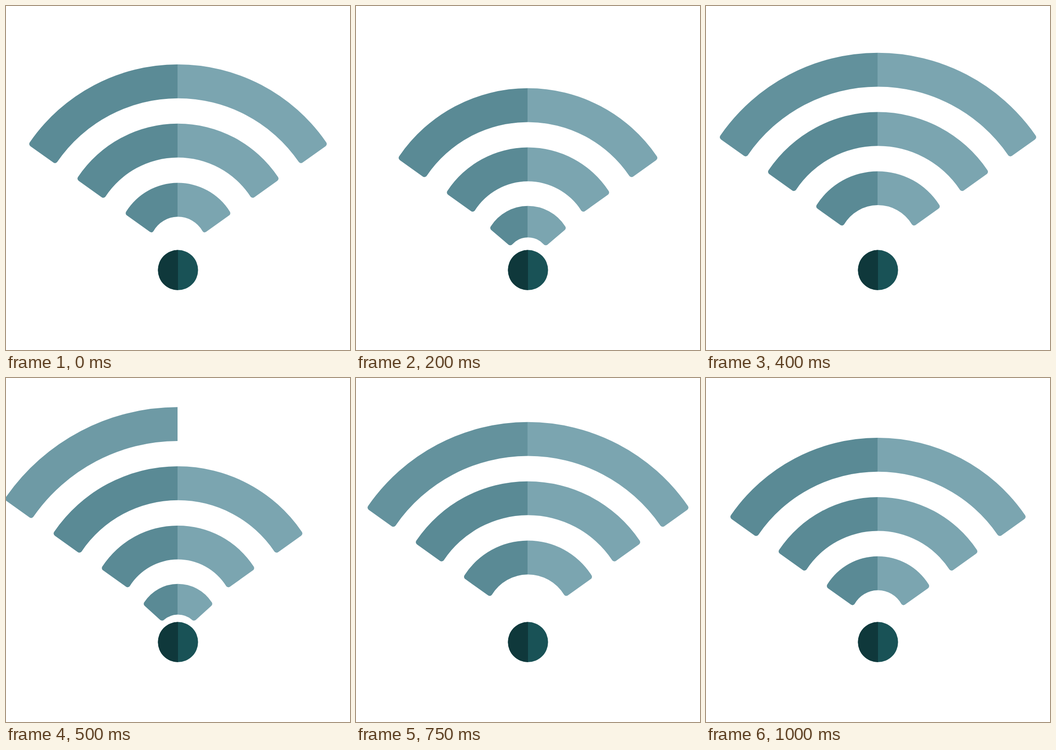
Write an HTML page that moves like this. It is 748 px wide and 748 px high and loops after 1020 ms.

```html
<!DOCTYPE html>
<html lang="en">
<head>
<meta charset="utf-8">
<title>Wireless signal</title>
<style>
  html, body { margin: 0; width: 100%; height: 100%; overflow: hidden; background: #fff; }
  svg { display: block; width: 100vw; height: 100vh; }
</style>
</head>
<body>
<svg viewBox="0 0 748 748">
  <g id="waves"></g>
  <circle cx="374" cy="574.2" r="43.6" fill="#195256"/>
  <path d="M374 530.6a43.6 43.6 0 0 0 0 87.2z" fill="#0f383b"/>
</svg>
<script>
const LOOP = 1020, STEP = 25;
const CENTER = 374, SEAM = 373;
const TOP = 127, SPACING = 128.8, THICKNESS = 73.7;
const RISE = 9.625, MAX_RISE = 383.3;   // px per step, px per loop
const CORNER = 6;
const BIRTH = 457, RIGHT_END = 65, LEFT_END = 52;
const GROWN = 394;                      // above this height the shape only widens
const DARK = [90, 138, 149], LIGHT = [123, 165, 176];
const WAVES = 6;

const waves = document.getElementById('waves');
const addPath = () => waves.appendChild(
  document.createElementNS('http://www.w3.org/2000/svg', 'path'));
const pairs = Array.from({ length: WAVES }, () => ({ right: addPath(), left: addPath() }));

const rgb = c => `rgb(${c.map(Math.round).join()})`;
const mix = (a, b, f) => a.map((v, i) => v + (b[i] - v) * f);

// Circle centred on the axis that passes through the crown and an end corner.
function rim(crown, x, y) {
  const h = y - crown;
  const r = (x * x + h * h) / (2 * h);
  const angle = Math.asin(x / r) - CORNER / r;
  return { r, x: r * Math.sin(angle), y: crown + r - r * Math.cos(angle) };
}

// One half of a wave whose crown is at height p; side is -1 (left) or 1 (right).
function halfWave(p, side) {
  const d = p - TOP, young = Math.max(0, p - GROWN);
  const outerTop = p - 0.036 * young;
  const innerTop = p + THICKNESS - 0.16 * young;
  const ax = 325.7 - 0.815 * d + 0.24 * young, ay = 301.4 + 0.585 * d + 0.035 * young;
  const bx = 265.9 - 0.815 * d + 0.57 * young, by = 344.1 + 0.585 * d - 0.055 * young;
  const outer = rim(outerTop, ax, ay), inner = rim(innerTop, bx, by);
  const len = Math.hypot(bx - ax, by - ay);
  const ux = (bx - ax) / len * CORNER, uy = (by - ay) / len * CORNER;
  const pt = (x, y) => `${(CENTER + side * x).toFixed(2)} ${y.toFixed(2)}`;
  const out = side > 0 ? 1 : 0, back = 1 - out;
  const arc = (r, sweep) => `A${r} ${r} 0 0 ${sweep} `;
  return `M${SEAM} ${outerTop}` + arc(outer.r, out) + pt(outer.x, outer.y) +
    arc(CORNER, out) + pt(ax + ux, ay + uy) +
    'L' + pt(bx - ux, by - uy) +
    arc(CORNER, out) + pt(inner.x, inner.y) +
    arc(inner.r, back) + `${SEAM} ${innerTop}Z`;
}

function draw(ms) {
  const tick = Math.floor((Math.floor(ms / 10) * 10 + 5) / STEP);
  const rise = Math.min(tick * RISE, MAX_RISE);
  pairs.forEach(({ left, right }, i) => {
    const p = TOP + i * SPACING - rise;
    const born = p < BIRTH;
    const fade = Math.min(1, Math.max(0, (130 - p) / 110));
    left.setAttribute('d', born && p > LEFT_END ? halfWave(p, -1) : '');
    left.setAttribute('fill', rgb(mix(DARK, LIGHT, fade)));
    right.setAttribute('d', born && p > RIGHT_END ? halfWave(p, 1) : '');
    right.setAttribute('fill', rgb(LIGHT));
  });
}

const start = performance.now();
function frame() {
  draw((performance.now() - start) % LOOP);
  requestAnimationFrame(frame);
}
frame();
</script>
</body>
</html>
```
